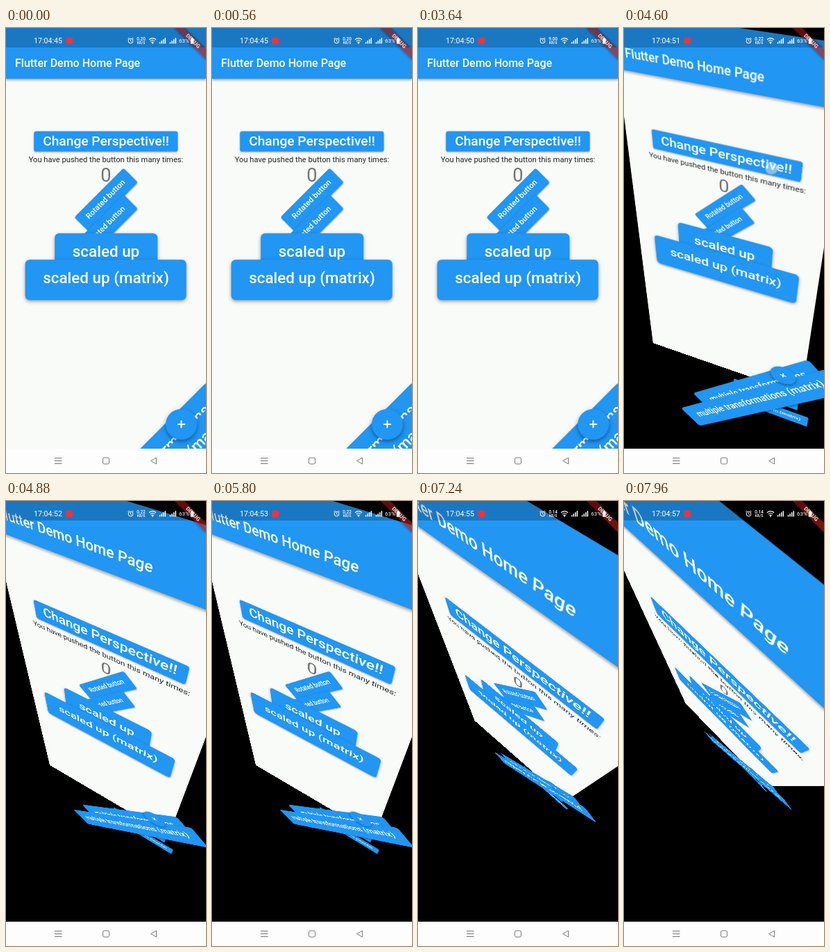
These frames come from a looping animation (288x640 px, 8000 ms). An HTML page:

```html
<!DOCTYPE html>
<html lang="en">
<head>
<meta charset="utf-8">
<title>Perspective demo</title>
<style>
  html, body { margin: 0; width: 100%; height: 100%; overflow: hidden; background: #000; }
  #stage { position: relative; width: 288px; height: 640px; overflow: hidden; background: #000;
    font-family: Roboto, "Noto Sans", sans-serif; }
  #stage div { position: absolute; box-sizing: border-box; white-space: nowrap; }
  #page { left: 0; top: 0; width: 288px; height: 605px; background: #f9fbf9; transform-origin: 144px 302.5px; }
  #bar { left: 0; top: 0; width: 288px; height: 73px; background: #2196f3;
    box-shadow: 0 2px 3px rgba(0,0,0,.26), 0 1px 5px rgba(0,0,0,.14); }
  #title { left: 13px; top: 28px; line-height: 45px; font-size: 16px; font-weight: 500; color: #fff; }
  .label { left: 144px; transform: translate(-50%, -50%); }
  .btn { left: 144px; height: 28.8px; line-height: 28.8px; padding: 0 12.8px; border-radius: 3.2px;
    background: #2196f3; color: #fff; font-size: 11.2px; font-weight: 500;
    box-shadow: 0 1px 2px rgba(0,0,0,.3), 0 1px 4px rgba(0,0,0,.12); }
  #fab { left: 230.4px; top: 547.6px; width: 44.8px; height: 44.8px; border-radius: 50%; background: #2196f3;
    box-shadow: 0 3px 5px rgba(0,0,0,.26), 0 2px 9px rgba(0,0,0,.16); }
  #fab::before, #fab::after { content: ""; position: absolute; background: #fff;
    left: 16.8px; top: 21.6px; width: 11.2px; height: 1.6px; }
  #fab::after { transform: rotate(90deg); }
  #banner { left: 288px; top: 0; width: 0; height: 0; transform: rotate(45deg); }
  #banner div { left: -32px; top: 22.4px; width: 64px; height: 9.6px; line-height: 9.8px; text-align: center;
    background: rgba(183,28,28,.64); box-shadow: 0 0 4px rgba(0,0,0,.5); color: #fff; font-size: 8px; font-weight: 900; }
  #touch { width: 19px; height: 19px; margin: -9.5px; border-radius: 50%;
    background: rgba(255,255,255,.42); border: 1px solid rgba(125,135,190,.6); }
  #status { left: 0; top: 0; width: 288px; height: 28px; background: rgba(0,0,0,.2); }
  #nav { left: 0; top: 605px; width: 288px; height: 35px; background: #fdfdfd; }
  svg { position: absolute; left: 0; top: 0; }
  svg text { fill: #fff; font-family: Roboto, "Noto Sans", sans-serif; }
</style>
</head>
<body>
<div id="stage">
  <div id="page">
    <div id="bar"></div>
    <div id="title">Flutter Demo Home Page</div>
    <div class="label" style="top:189px;font-size:11.2px;color:rgba(0,0,0,.87)">You have pushed the button this many times:</div>
    <div class="label" style="top:211.5px;font-size:27.2px;color:rgba(0,0,0,.54)">0</div>
  </div>
  <div id="touch"></div>
  <div id="banner"><div>DEBUG</div></div>
  <div id="status">
    <svg width="288" height="28" fill="none" stroke="#fff">
      <text id="clock" x="40" y="21.8" font-size="10.6" stroke="none"></text>
      <rect x="86.5" y="13.5" width="9.5" height="9.5" rx="2" fill="#f0323c" stroke="none"/>
      <circle cx="179.5" cy="18.6" r="3.4"/>
      <path d="M179.5 16.4v2.4l1.6 1M175.4 15.6l2-1.8M183.6 15.6l-2-1.8" stroke-width=".9"/>
      <g stroke="none" text-anchor="middle" font-weight="500">
        <text id="speed" x="194.5" y="17.6" font-size="6.4"></text>
        <text x="194.5" y="22.8" font-size="5">KB/S</text>
      </g>
      <path d="M206 16.8q5-4.4 10 0M207.8 18.9q3.2-2.8 6.4 0M209.4 20.8q1.6-1.4 3.2 0" stroke-width="1.2"/>
      <circle cx="211" cy="22" r=".9" fill="#fff" stroke="none"/>
      <path id="bars" stroke-width="1.5"/>
      <text x="249" y="21.4" font-size="8" stroke="none">63%</text>
      <rect x="265.8" y="15.2" width="4.4" height="7.6" rx=".8" fill="#fff" stroke="none"/>
      <rect x="267" y="14" width="2" height="1.4" fill="#fff" stroke="none"/>
    </svg>
  </div>
  <div id="nav">
    <svg width="288" height="35" fill="none" stroke="#777">
      <path d="M70 13.5h10.5M70 17.5h10.5M70 21.5h10.5"/>
      <rect x="139.5" y="13" width="9" height="9" rx="2"/>
      <path d="M216.5 13v9l-8-4.5z" stroke-linejoin="round"/>
    </svg>
  </div>
</div>
<script>
const LOOP = 8000;
const $ = id => document.getElementById(id);
const page = $("page"), touch = $("touch"), clock = $("clock"), speed = $("speed");

function add(text, y, move = "", size = "") {
  const el = document.createElement("div");
  el.className = "btn";
  el.textContent = text;
  el.style.top = y + "px";
  el.style.transform = `translate(-50%, -50%) ${move}`;
  el.style.fontSize = size;
  page.append(el);
}

const turn = "rotate(-45deg)", grow = "scale(2)", shift = "translate(80px, 240px)";
const multi = `translate(60px, 158px) ${turn} ${grow}`;
add("Change Perspective!!", 163.4, "", "19.2px");
[["Rotated button", turn], ["Rotated button", turn],
 ["scaled up", grow], ["scaled up (matrix)", grow],
 ["translate transform", shift], ["translate transform (matrix)", shift],
 ["multiple transformations", multi], ["multiple transformations (matrix)", multi]
].forEach(([text, move], i) => add(text, 246.9 + 38.4 * i, move));

const fab = document.createElement("div");
fab.id = "fab";
page.append(fab);

// two sets of signal bars
let d = "";
for (const x of [221.5, 236.5])
  for (let i = 0; i < 4; i++) d += `M${x + i * 2.6} 22.5v${-2.2 - i * 2}`;
$("bars").setAttribute("d", d);

// [time, tilt level]; each tap tilts the page further
const tilts = [[3840, 0], [4700, 0.4], [5950, 0.66], [6750, 0.82], [7700, 1.01]];
const speeds = [[0, "0.20"], [920, "9.00"], [3920, "0.22"], [6200, "0.14"]];
// [from, to, x, y, end x, end y]
const touches = [
  [1640, 1880, 242, 226], [2040, 2480, 250, 232, 151, 382],
  [3700, 3840, 206, 166], [4440, 4700, 212, 201],
  [5830, 5950, 190, 206], [6440, 6750, 152, 216], [7500, 7700, 150, 235]
];

const latest = (list, t) => list.filter(e => e[0] <= t).pop();

function draw(now) {
  const t = now % LOOP;

  const tilt = latest(tilts, t);
  if (tilt) {
    const u = tilt[1];
    page.style.transform =
      `perspective(${800 / (1 + u)}px) rotateX(${-0.7 - 0.6 * u}rad) rotateY(${-0.4 * (1 + u)}rad)`;
  } else {
    page.style.transform = "none";
  }

  const hit = touches.find(e => t >= e[0] && t < e[1]);
  touch.style.display = hit ? "block" : "none";
  if (hit) {
    const [from, to, x, y, x2 = x, y2 = y] = hit;
    const p = (t - from) / (to - from);
    touch.style.left = x + (x2 - x) * p + "px";
    touch.style.top = y + (y2 - y) * p + "px";
  }

  clock.textContent = "17:04:" + Math.floor(45.08 + t * 0.0015);
  speed.textContent = latest(speeds, t)[1];
}

function tick() {
  draw(performance.now());
  requestAnimationFrame(tick);
}
tick();
</script>
</body>
</html>
```
